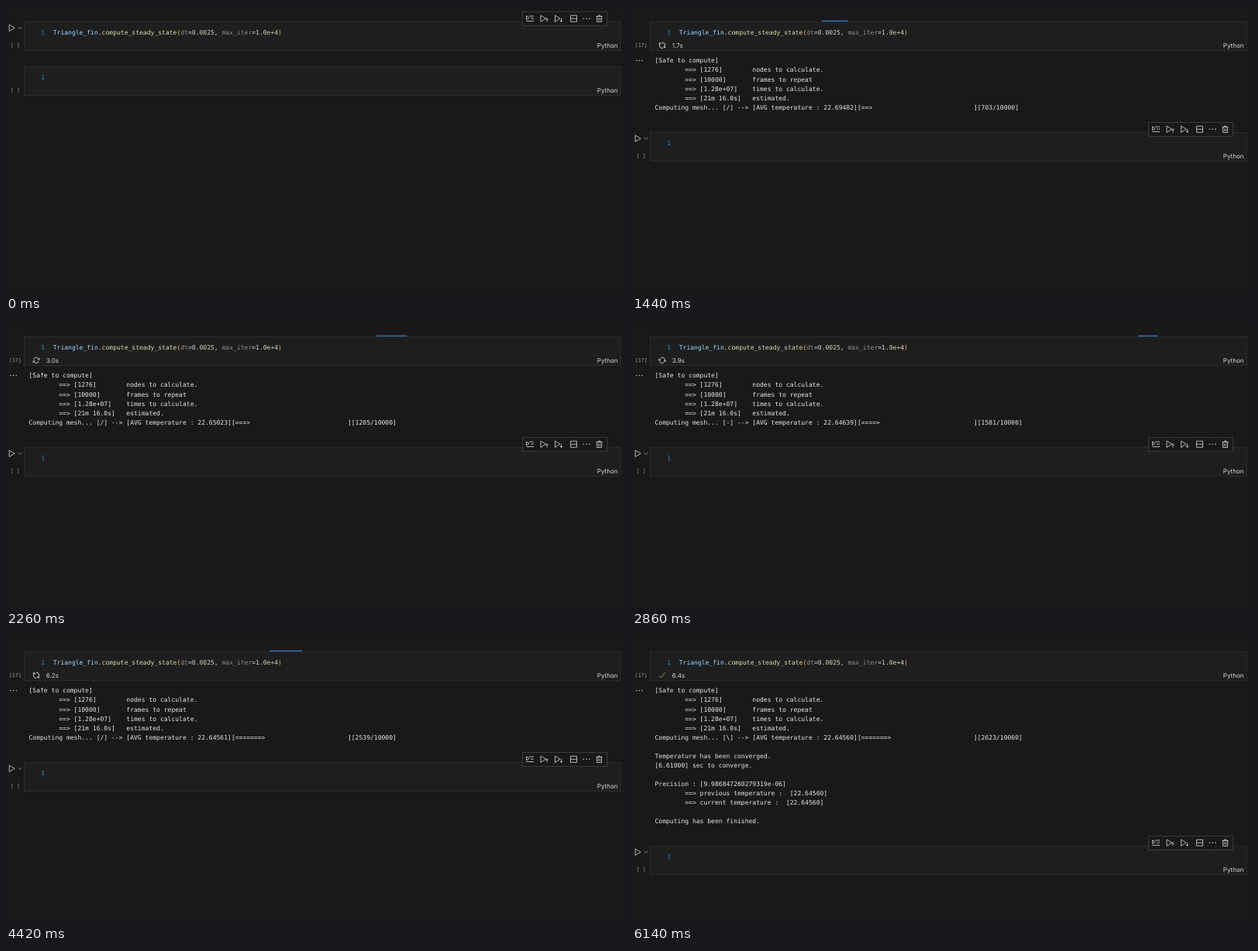
These frames come from a looping animation (800x371 px, 6.16 s). An HTML page with a canvas:

```html
<!DOCTYPE html>
<html lang="en">
<head>
<meta charset="utf-8">
<title>Notebook run</title>
<style>
html, body { margin: 0; width: 100%; height: 100%; overflow: hidden; background: #1a191a; }
canvas { display: block; }
</style>
</head>
<body>
<canvas id="stage" width="800" height="371"></canvas>
<script>
const ctx = document.getElementById('stage').getContext('2d');
const LOOP = 6160, TICK = 20, SCALE = 0.67;
const START = 260, OUTPUT = 340, DONE = 4560;
const MONO = '"DejaVu Sans Mono", monospace', SANS = 'Inter, sans-serif';
const CHAR = 12 * SCALE * 0.602, LINE = 18 * SCALE;

// Iteration counter: [time in ms, iterations]
const PROGRESS = [[305, 0], [1440, 703], [2260, 1205], [2860, 1581],
                  [3660, 2080], [4420, 2539], [DONE, 2623]];

const CODE = [
  ['Triangle_fin', '#9cdcfe'], ['.', '#d4d4d4'], ['compute_steady_state', '#dcdcaa'],
  ['(', '#e8c93c'], ['dt', '#8e8e8e'], ['=', '#d4d4d4'], ['0.0025', '#c9d8c0'],
  [', ', '#d4d4d4'], ['max_iter', '#8e8e8e'], ['=', '#d4d4d4'], ['1.0e+4', '#c9d8c0'],
  [')', '#e8c93c']
];
const HEADER = [
  '[Safe to compute]',
  '        ==> [1276]        nodes to calculate.',
  '        ==> [10000]       frames to repeat',
  '        ==> [1.28e+07]    times to calculate.',
  '        ==> [21m 16.0s]   estimated.'
];
const FOOTER = [
  '', 'Temperature has been converged.', '[6.61000] sec to converge.', '',
  'Precision : [9.986847260279319e-06]',
  '        ==> previous temperature :  [22.64560]',
  '        ==> current temperature :  [22.64560]',
  '', 'Computing has been finished.'
];
const ICONS = {
  play: 'M-3-4.2V4.2L4 0Z',
  chevron: 'M-2.5-1.2L0 1.2L2.5-1.2',
  byLine: 'M-4.5-3.5V1.5L-1-1ZM-1-3.2H5M1-.2H5M-4.5 3.2H5',
  above: 'M-4.5-4.2V4.2L2-.2ZM3.5 4.2V-.5M1.8 1.2L3.5-.5L5.2 1.2',
  below: 'M-4.5-4.2V4.2L2-.2ZM3.5-.5V4.2M1.8 2.5L3.5 4.2L5.2 2.5',
  split: 'M-4-4H4V4H-4ZM-4 0H4',
  trash: 'M-4-2.8H4M-1.3-2.8V-4.2H1.3V-2.8M-3-2.8V4.2H3V-2.8M-1-1V2.6M1-1V2.6',
  sync: 'M-3.4-1A3.5 3.5 0 0 1 3.4-1M4-3V-.8H1.8M3.4 1A3.5 3.5 0 0 1-3.4 1M-4 3V.8H-1.8',
  check: 'M-3.8.6L-1.4 3L3.8-3.4'
};

// Text with its capitals centred on y; size is in unscaled editor pixels.
function text(str, x, y, color, family = MONO, size = 12, align = 'left') {
  ctx.save();
  ctx.translate(x, y + size * SCALE * 0.36);
  ctx.scale(SCALE, SCALE);
  ctx.font = `${size}px ${family}`;
  ctx.textRendering = 'geometricPrecision';
  ctx.textAlign = align;
  ctx.fillStyle = color;
  ctx.fillText(str, 0, 0);
  ctx.restore();
}

function icon(name, x, y, color = '#c5c5c5', angle = 0) {
  ctx.save();
  ctx.translate(x, y);
  ctx.rotate(angle);
  ctx.strokeStyle = color;
  ctx.lineWidth = 0.9;
  ctx.stroke(new Path2D(ICONS[name]));
  ctx.restore();
}

function dots(x, y) {
  ctx.fillStyle = '#c5c5c5';
  for (const dx of [-3.8, 0, 3.8]) {
    ctx.beginPath();
    ctx.arc(x + dx, y, 0.8, 0, 7);
    ctx.fill();
  }
}

function box(x, y, w, h, fill, stroke) {
  ctx.fillStyle = fill;
  ctx.fillRect(x, y, w, h);
  ctx.strokeStyle = stroke;
  ctx.lineWidth = 1;
  ctx.strokeRect(x, y, w, h);
}

function cell(top, label) {
  box(23.5, top, 769.5, 37, '#1f1e1f', '#2d2c2d');
  text('1', 45.2, top + 14, '#2b8cb5');
  text(label, 11.7, top + 30.3, '#999', MONO, 10, 'center');
  text('Python', 789.5, top + 30.3, '#d6d6d6', SANS, 12, 'right');
}

function focus(top) {
  icon('play', 7.2, top + 7.8);
  icon('chevron', 18, top + 7.8, '#8a8a8a');
  box(666.5, top - 13, 109, 18, '#1a191a', '#3a393a');
  const y = top - 4.2;
  icon('byLine', 676, y);
  icon('above', 694.5, y);
  icon('below', 713, y);
  icon('split', 732.5, y);
  dots(749, y);
  icon('trash', 765.5, y);
}

function iterations(t) {
  if (t <= PROGRESS[0][0]) return 0;
  const i = PROGRESS.findIndex(p => p[0] >= t);
  if (i < 0) return PROGRESS.at(-1)[1];
  const [t0, n0] = PROGRESS[i - 1], [t1, n1] = PROGRESS[i];
  return Math.round(n0 + (n1 - n0) * (t - t0) / (t1 - t0));
}

function statusLine(t) {
  const n = iterations(t);
  const spin = t >= DONE ? '\\' : '|/-\\'[Math.floor(((t - 1440) / 273 + 10.39) * 4) % 4];
  const temp = (22.645598 + 0.049222 * Math.exp(-0.00471 * (n - 703))).toFixed(5);
  const bar = ('='.repeat(n * 30 / 10000) + '>').padEnd(30);
  return `Computing mesh... [${spin}] --> [AVG temperature : ${temp}][${bar}][${n}/10000]`;
}

// Indeterminate bar: crosses the cell, three times as wide at the middle.
function progressBar(t) {
  const p = (t - 649) / 2640 % 1, unit = 15.4;
  if (p < 0) return;
  const shift = p < 0.5 ? 50 * p : 25 + 48 * (p - 0.5);
  const width = unit * (3 - 4 * Math.abs(p - 0.5));
  ctx.fillStyle = '#2a6ca3';
  ctx.fillRect(23.5 + unit * (shift + 0.5) - width / 2, 18.5, width, 1.5);
}

function draw(t) {
  const running = t >= START, done = t >= DONE, output = t >= OUTPUT;
  const first = 20.5, second = done ? 271.5 : output ? 163.5 : 78.5;
  ctx.fillStyle = '#1a191a';
  ctx.fillRect(0, 0, 800, 371);

  cell(first, output ? '[17]' : '[ ]');
  cell(second, '[ ]');
  focus(running ? second : first);

  let x = 60.7;
  for (const [str, color] of CODE) {
    text(str, x, first + 14, color);
    x += str.length * CHAR;
  }

  if (running) {
    const seconds = done ? 6.4 : Math.max(0, 1.72 + (t - 1440) * 0.001515);
    text(seconds.toFixed(1) + 's', 51.8, first + 30.3, '#d6d6d6', SANS);
    if (done) icon('check', 39, first + 30.3, '#a3a840');
    else {
      icon('sync', 39, first + 30.3, '#c5c5c5', (t - 2260) / 990 * 2 * Math.PI);
      progressBar(t);
    }
  }
  if (output) {
    dots(9.5, 70.5);
    const lines = [...HEADER, statusLine(t), ...(done ? FOOTER : [])];
    lines.forEach((line, i) => text(line, 29.5, 70.5 + i * LINE, '#e7e7e7'));
  }
}

const begin = performance.now();
function frame() {
  const t = (performance.now() - begin) % LOOP;
  draw(Math.floor(t / TICK) * TICK);
  requestAnimationFrame(frame);
}
frame();
</script>
</body>
</html>
```
